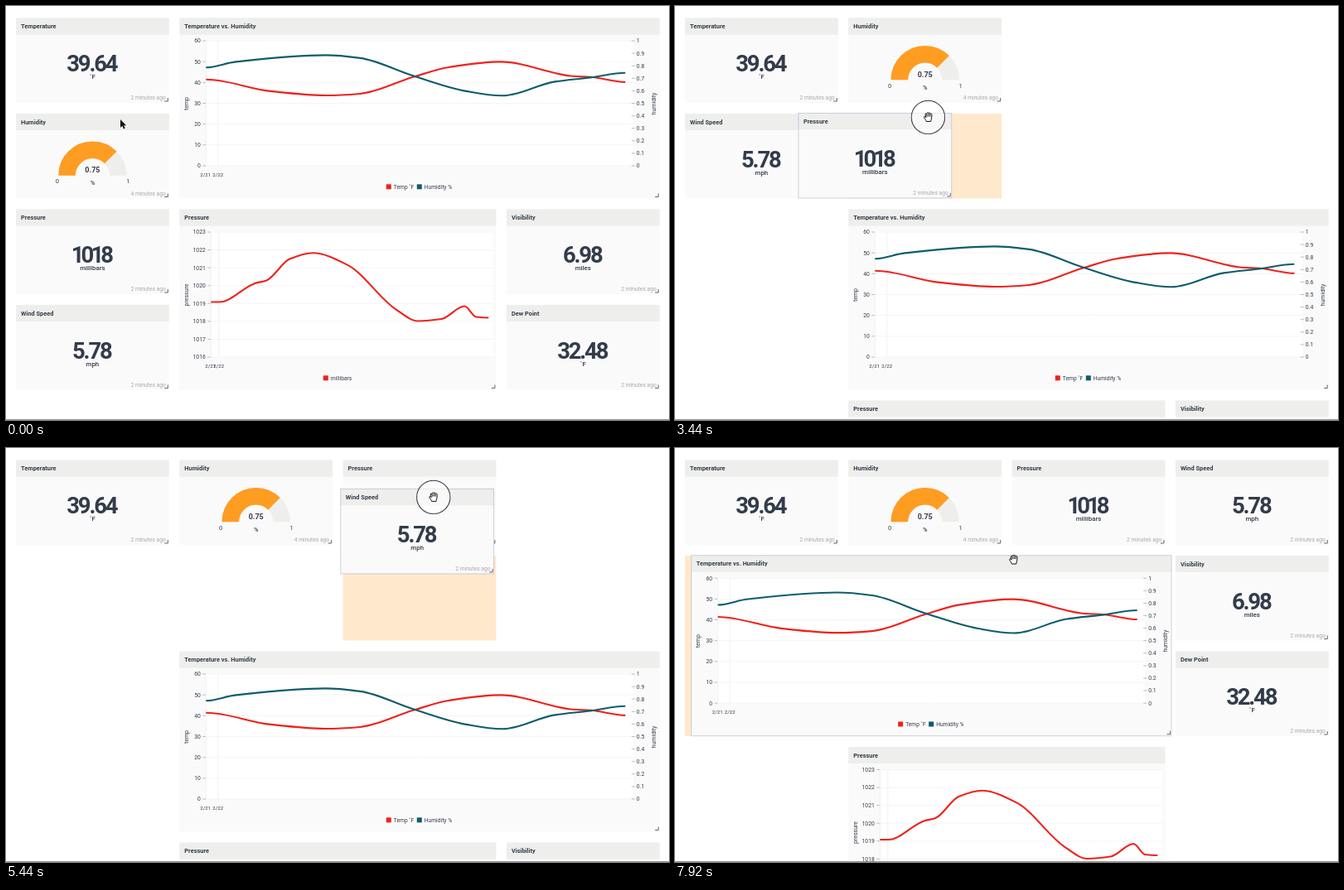
An HTML page with a canvas that plays this animation: 800 px wide and 500 px high, repeating every 8000 ms.

```html
<!DOCTYPE html>
<html lang="en">
<head>
<meta charset="utf-8">
<title>Weather dashboard</title>
<style>
  html, body { margin: 0; width: 100%; height: 100%; overflow: hidden; background: #fff; }
  canvas { display: block; }
</style>
</head>
<body>
<canvas id="stage" width="800" height="500"></canvas>
<script>
const c = document.getElementById('stage').getContext('2d');
const LOOP = 8000, SETTLE = 250, TAU = Math.PI * 2;
const INK = '#333c4a', RED = '#f0211c', TEAL = '#0d5d6c', ORANGE = '#ff9c22';
const FONT = 'Roboto, "Open Sans", sans-serif';

// Dashboard grid
const spanW = n => n * 197.3 - 12.5;
const spanH = n => n * 115.5 - 13;
const corner = ([, col, row]) => [12 + col * 197.3, 14.5 + row * 115.5];
const MID = spanW(1) / 2;

function text(str, x, y, size, { color = INK, weight = 400, align = 'center', spacing = 0 } = {}) {
  c.font = `${weight} ${size}px ${FONT}`;
  c.fillStyle = color;
  c.textAlign = align;
  c.letterSpacing = spacing + 'px';
  c.fillText(str, x + spacing / 2, y);
}

function box(x, y, w, h, color) {
  c.fillStyle = color;
  c.fillRect(x, y, w, h);
}

function line(points, color) {
  c.beginPath();
  points.forEach(([x, y]) => c.lineTo(x, y));
  c.strokeStyle = color;
  c.lineWidth = 1;
  c.stroke();
}

function ring(x, y, r, color, width, from = 0, to = TAU) {
  c.beginPath();
  c.arc(x, y, r, from, to);
  c.strokeStyle = color;
  c.lineWidth = width;
  c.stroke();
}

function sideways(str, x) {
  c.save();
  c.translate(x, 103.5);
  c.rotate(-Math.PI / 2);
  text(str, 0, 0, 7);
  c.restore();
}

// All charts share one vertical plot range
const TOP = 27.5, BOTTOM = 178.5;
const plotY = (v, lo, hi) => BOTTOM - (v - lo) / (hi - lo) * (BOTTOM - TOP);

// Monotone curve through a few [x, value] turning points
function curve(points, lo, hi, color) {
  const pts = points.map(([x, v]) => [x, plotY(v, lo, hi)]);
  const rise = i => pts[i] && pts[i + 1] ? (pts[i + 1][1] - pts[i][1]) / (pts[i + 1][0] - pts[i][0]) : 0;
  const slope = i => {
    const a = rise(i - 1), b = rise(i);
    return a * b > 0 ? 2 * a * b / (a + b) : 0;
  };
  c.beginPath();
  c.moveTo(...pts[0]);
  for (let i = 1; i < pts.length; i++) {
    const [[x0, y0], [x1, y1]] = [pts[i - 1], pts[i]], third = (x1 - x0) / 3;
    c.bezierCurveTo(x0 + third, y0 + third * slope(i - 1), x1 - third, y1 - third * slope(i), x1, y1);
  }
  c.strokeStyle = color;
  c.lineWidth = 2.1;
  c.lineJoin = 'round';
  c.stroke();
}

function plot(left, second, right, lo, step, count) {
  box(left, TOP, right - left, BOTTOM - TOP, '#fff');
  for (let i = 0; i <= count; i++) {
    const y = plotY(i, 0, count);
    line([[left, y], [right, y]], '#f5f5f5');
    line([[left - 4, y], [left, y]], '#bbb');
    text(lo + i * step, left - 6.5, y + 2.4, 6.8, { align: 'right' });
  }
  for (const x of [left, second]) line([[x, TOP], [x, BOTTOM]], '#f1f1f1');
  text('2/21', left - 0.5, 191.5, 6.2);
  text('2/22', second, 191.5, 6.2);
}

function legend(x, label, color) {
  box(x, 200.8, 6, 6, color);
  text(label, x + 9, 206.4, 6.7, { align: 'left' });
}

function comparison() {
  plot(32, 46.5, 547.5, 0, 10, 6);
  for (let i = 0; i <= 10; i++) {
    const y = plotY(i, 0, 10);
    line([[545.5, y], [549.5, y]], '#bbb');
    text(i / 10, 551.5, y + 2.4, 6.8, { align: 'left' });
  }
  sideways('temp', 10.5);
  sideways('humidity', 574.5);
  curve([[32, 41.4], [110, 35.8], [176, 33.8], [218, 34.6], [282, 42.6], [325, 47.3],
    [388, 49.9], [475, 43], [496, 42.6], [538, 40.2]], 0, 60, RED);
  curve([[32, 78.6], [68, 83.2], [176, 88.5], [218, 86.2], [282, 72], [346, 59.7],
    [389, 56.1], [453, 67.3], [496, 70.6], [538, 74.3]], 0, 100, TEAL);
  legend(249.5, 'Temp ˚F', RED);
  legend(286.5, 'Humidity %', TEAL);
}

function pressureChart() {
  plot(38, 47.5, 378.5, 1016, 1, 7);
  sideways('pressure', 10.5);
  curve([[38, 1019.08], [48, 1019.08], [91, 1020.13], [105, 1020.29], [133, 1021.49], [161, 1021.83],
    [203, 1021.15], [260, 1018.71], [288, 1018.02], [316, 1018.13], [344, 1018.85],
    [358, 1018.25], [373, 1018.2]], 1016, 1023, RED);
  legend(173.5, 'millibars', RED);
}

function gauge() {
  ring(MID, 74.7, 30.9, '#eeeeec', 20.6, Math.PI, TAU);
  ring(MID, 74.7, 30.9, ORANGE, 20.6, Math.PI, Math.PI * 1.75);
  text('0.75', MID, 71.2, 9, { weight: 700 });
  text('0', MID - 42.5, 84.3, 7.5);
  text('1', MID + 43, 84.3, 7.5);
  text('%', MID, 86.3, 7.5, { weight: 500 });
}

const reading = (value, unit, spacing = -2.2) => () => {
  text(value, MID, 64.5, 27.5, { weight: 600, spacing });
  text(unit, MID, 73.8, 7.9, { weight: 500 });
};

// Charts and right-hand panels slide down together while a tile pushes in
const pushed = (col, row) => [[0, 0], [1450, 1], [3150, 2], [3640, 1], [5190, 2], [5560, 1]]
  .map(([t, shift]) => [t, col, row + shift]);

// track: [time, column, row]; drag: [press, release]
const panel = (title, draw, track, { cols = 1, rows = 1, age = '2 minutes ago', drag } = {}) =>
  ({ title, draw, track, age, drag, w: spanW(cols), h: spanH(rows) });

const panels = [
  panel('Temperature', reading('39.64', '˚F'), [[0, 0, 0]]),
  panel('Pressure', pressureChart, pushed(1, 2), { cols: 2, rows: 2, age: '' }),
  panel('Visibility', reading('6.98', 'miles'), [...pushed(3, 2), [7180, 3, 1]]),
  panel('Dew Point', reading('32.48', '˚F'), [...pushed(3, 3), [7180, 3, 2]]),
  panel('Temperature vs. Humidity', comparison, [...pushed(1, 0), [7180, 0, 1]],
    { cols: 3, rows: 2, age: '', drag: [6860, 7840] }),
  panel('Wind Speed', reading('5.78', 'mph'),
    [[0, 0, 3], [1450, 0, 2], [3150, 0, 1], [5190, 1, 1], [5320, 2, 1], [5560, 3, 0]],
    { drag: [4960, 5800] }),
  panel('Pressure', reading('1018', 'millibars', -4),
    [[0, 0, 2], [1450, 0, 1], [3150, 1, 1], [3640, 2, 0]], { drag: [2760, 4060] }),
  panel('Humidity', gauge, [[0, 0, 1], [1450, 1, 0]], { age: '4 minutes ago', drag: [940, 1920] }),
];

const clamp = u => Math.max(0, Math.min(1, u));
const smooth = u => u * u * (3 - 2 * u);
const easeOut = u => 1 - (1 - u) ** 3;
const mix = (a, b, u) => a.map((v, i) => v + (b[i] - v) * u);

// Pointer trips: [depart, arrive, x, y, easing]
const trips = [
  [0, 400, 131, 141],
  [940, 1840, 297, 23],
  [2100, 2560, 168.5, 135],
  [2760, 3440, 304, 135],
  [3440, 3980, 558, 32, easeOut],
  [4360, 4880, 124, 140],
  [4960, 5720, 688, 24],
  [6240, 6720, 581, 136],
  [6860, 7410, 408.5, 135],
];

const pointer = t => trips.reduce((pos, [depart, arrive, x, y, ease = smooth]) =>
  mix(pos, [x, y], ease(clamp((t - depart) / (arrive - depart)))), [138, 138]);

const settle = (from, to, elapsed) => mix(from, to, easeOut(clamp(elapsed / SETTLE)));
const stepAt = (p, t) => p.track.findLastIndex(s => s[0] <= t);
const cell = (p, t) => corner(p.track[stepAt(p, t)]);

function slide(p, t) {
  const i = stepAt(p, t);
  return i ? settle(corner(p.track[i - 1]), cell(p, t), t - p.track[i][0]) : cell(p, t);
}

function carried(p, t) {
  const from = pointer(p.drag[0]), now = pointer(t);
  return cell(p, p.drag[0]).map((v, i) => v + now[i] - from[i]);
}

function place(p, t) {
  if (!p.drag || t < p.drag[0]) return slide(p, t);
  const release = p.drag[1];
  return t < release ? carried(p, t) : settle(carried(p, release), cell(p, t), t - release);
}

function icons(x, y) {
  ring(x, y, 1.9, INK, 1.6);
  c.setLineDash([1.2, 1.16]);
  ring(x, y, 3, INK, 1);
  c.setLineDash([]);
  box(x + 8.4, y - 1.6, 4.2, 4.8, INK);
  box(x + 8, y - 2.8, 5, 0.9, INK);
  box(x + 9.6, y - 3.4, 1.8, 0.8, INK);
}

function drawPanel(p, [x, y], lifted, hovered) {
  c.save();
  c.translate(x, y);
  box(0, 0, p.w, p.h, '#fafafa');
  box(0, 0, p.w, 20, '#eeeeec');
  text(p.title, 6, 12.6, 7.4, { weight: 600, align: 'left' });
  p.draw();
  text(p.age, p.w - 4, p.h - 3.8, 6.7, { color: '#a9a9a9', align: 'right' });
  line([[p.w - 1.5, p.h - 6], [p.w - 1.5, p.h - 2], [p.w - 5.5, p.h - 2]], '#666');
  if (hovered) icons(p.w - 17, 10);
  if (lifted) {
    c.strokeStyle = 'rgba(140, 145, 180, .4)';
    c.lineWidth = 1;
    c.strokeRect(0, 0, p.w, p.h);
  }
  c.restore();
}

const arrow = new Path2D('M0 0V10L2.3 7.8L4 11.5L5.8 10.7L4.2 7.2H7.2Z');
const hand = new Path2D('M-4.6 .6C-5.6-1-4-1.7-3.2-.6L-2.5 .2L-3.4-3.4C-3.6-4.8-2.1-5-1.7-3.8' +
  'L-1.3-5C-1.1-6 .5-6 .6-4.8C1.2-5.9 2.6-5.5 2.6-4.2C3.6-4.8 4.6-4.2 4.5-3L4.2 .8' +
  'C4 2.5 3.4 3.2 3.2 5H-2.2C-2.4 3.4-3.6 2.4-4.6 .6Z');
const fingers = new Path2D('M-1.7-3.8L-1.2-.8M.6-4.8V-1M2.6-4.2L2.4-.8');

function drawPointer([x, y], grabbing, pressed) {
  c.save();
  c.translate(x, y);
  if (pressed) {
    ring(0, 0, 20, '#1b1f2c', 1.3);
    c.fillStyle = 'rgba(255, 255, 255, .6)';
    c.fill();
  }
  c.lineJoin = 'round';
  c.lineWidth = 1;
  if (grabbing) {
    c.fillStyle = '#fff';
    c.strokeStyle = '#111';
    c.fill(hand);
    c.stroke(hand);
    c.stroke(fingers);
  } else {
    c.translate(0, -1);
    c.fillStyle = '#111';
    c.strokeStyle = '#fff';
    c.stroke(arrow);
    c.fill(arrow);
  }
  c.restore();
}

function render(t) {
  box(0, 0, 800, 500, '#fff');
  const tip = pointer(t);
  const active = panels.find(p => p.drag && t >= p.drag[0] && t < p.drag[1] + SETTLE);
  const pressed = !!active && t < active.drag[1];
  const over = t > 200 && panels.find(p => {
    const [x, y] = place(p, t);
    return tip[0] > x && tip[0] < x + p.w && tip[1] > y && tip[1] < y + 20;
  });

  if (active) box(...cell(active, t), active.w, active.h, '#ffe9cc');
  for (const p of panels) if (p !== active) drawPanel(p, place(p, t), false, p === over && !active);
  if (active) drawPanel(active, place(active, t), true, false);
  box(0, 499, 800, 1, '#929292');
  drawPointer(tip, pressed || !!over, pressed);
}

const start = performance.now();
function tick() {
  render((performance.now() - start) % LOOP);
  requestAnimationFrame(tick);
}
tick();
</script>
</body>
</html>
```
